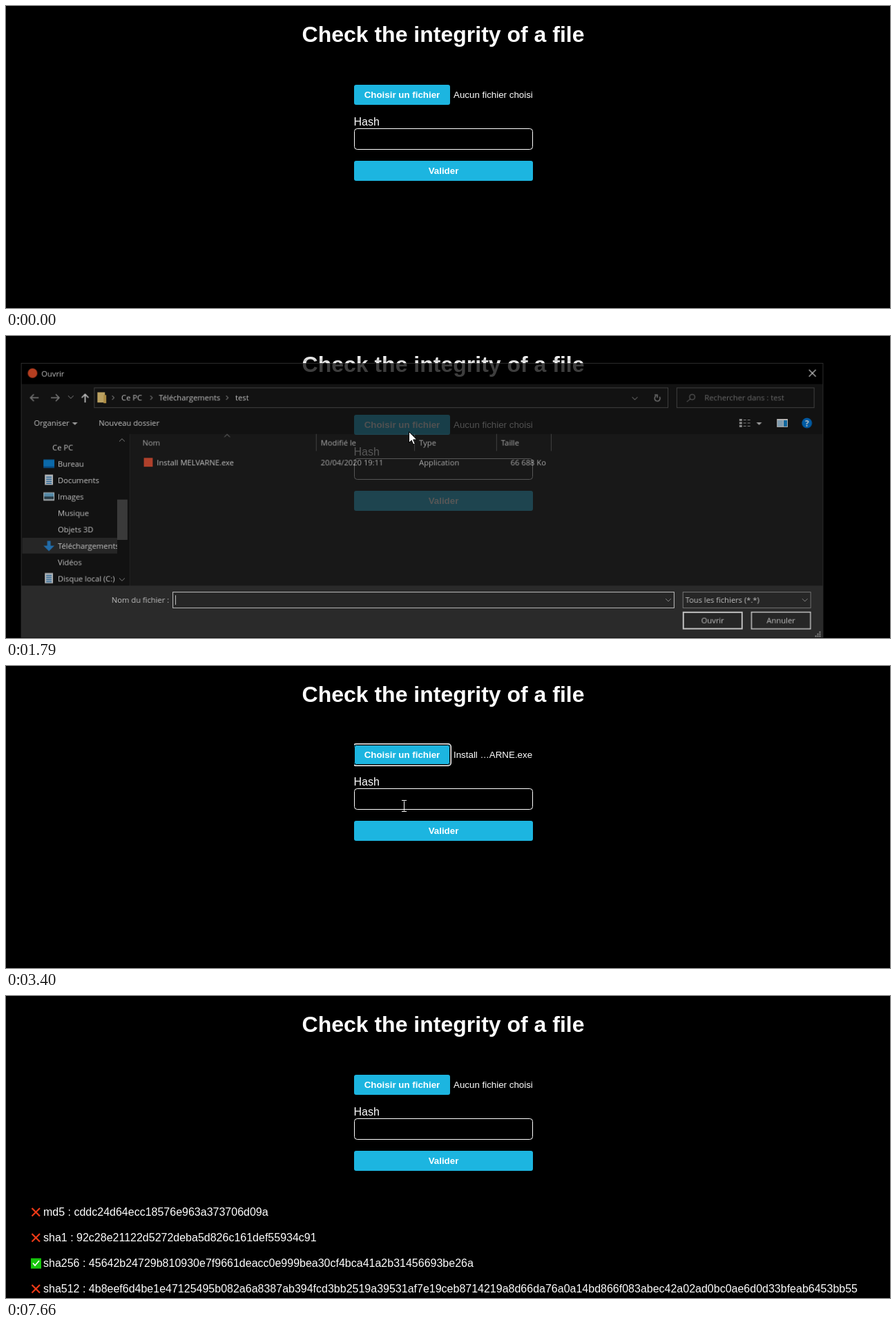
Recreate the animation shown at these times as an HTML page with a canvas. Size 1280 by 437 pixels, loop 8.41 s.

```html
<!DOCTYPE html>
<html lang="en">
<head>
<meta charset="utf-8">
<title>File integrity check</title>
<style>
html, body { margin: 0; width: 100%; height: 100%; overflow: hidden; background: #000; }
canvas { display: block; }
</style>
</head>
<body>
<canvas id="stage" width="1280" height="437"></canvas>
<script>
const LOOP = 8410;
const ARIAL = '"Liberation Sans", Arial, sans-serif';
const UI = '11.3px "Open Sans", "Noto Sans", sans-serif';
const BLUE = '#1cb5e0';
const FILE = 'Install MELVARNE.exe';
const SHORT_FILE = 'Install …ARNE.exe';
const SHA256 = '45642b24729b810930e7f9661deacc0e999bea30cf4bca41a2b31456693be26a';
const RESULTS = [
  ['md5', 'cddc24d64ecc18576e963a373706d09a'],
  ['sha1', '92c28e21122d5272deba5d826c161def55934c91'],
  ['sha256', SHA256],
  ['sha512', '4b8eef6d4be1e47125495b082a6a8387ab394fcd3bb2519a39531af7e19ceb8714219a8d66da76a0a14bd866f083abec42a02ad0bc0ae6d0d33bfeab6453bb55']
];

// Pointer keys: time, x, y
const PATH = [
  [640, 656, 396], [1190, 596, 127], [1280, 596, 127], [1460, 583, 138],
  [1800, 583, 138], [2340, 290.5, 183], [2930, 290.5, 183],
  [3400, 576, 202], [3500, 577, 197], [3920, 577, 197], [4460, 591.5, 239],
  [6320, 591.5, 239], [6960, 552, 380], [7470, 552, 380], [7660, 488, 430]
];
const CLICKS = [[1410, 1510], [2670, 2740], [2800, 2880], [3550, 3650], [4790, 4880]];
const ARROW = new Path2D('M0 0V16L3.7 12.5L6.3 18.5L8.8 17.4L6.2 11.5H11.3Z');
const HAND = new Path2D('M-2 2Q-2 0 0 0Q2 0 2 2V7Q4.5 5.5 5 8Q7.5 6.8 8 9Q10 8.5 10 11V15Q10 18 8 20V23.3H-1V21Q-4 18 -7 13.5Q-6.5 10.5 -3.5 12.8L-2 14.5Z');

const stage = document.getElementById('stage').getContext('2d');
const sheet = document.createElement('canvas');
sheet.width = 1280;
sheet.height = 450;
const panel = sheet.getContext('2d');

const clamp = v => Math.max(0, Math.min(1, v));
const ease = v => v * v * (3 - 2 * v);
const during = (t, a, b) => t >= a && t < b;
const inside = (x, y, l, t, r, b) => x >= l && x < r && y >= t && y < b;

function box(c, x, y, w, h, fill) {
  c.fillStyle = fill;
  c.fillRect(x, y, w, h);
}
function frame(c, x, y, w, h, color, width = 1) {
  c.strokeStyle = color;
  c.lineWidth = width;
  c.strokeRect(x + width / 2, y + width / 2, w - width, h - width);
}
function rounded(c, x, y, w, h, r) {
  c.beginPath();
  c.roundRect(x, y, w, h, r);
}
function write(c, text, x, y, font, color = '#fff', align = 'left') {
  c.font = font;
  c.fillStyle = color;
  c.textAlign = align;
  c.fillText(text, x, y);
}
function line(c, color, width, ...pts) {
  c.strokeStyle = color;
  c.lineWidth = width;
  c.beginPath();
  for (let i = 0; i < pts.length; i += 2) c.lineTo(pts[i], pts[i + 1]);
  c.stroke();
}
function disc(c, x, y, r, color) {
  c.fillStyle = color;
  c.beginPath();
  c.arc(x, y, r, 0, Math.PI * 2);
  c.fill();
}

function button(x, y, w, label, focused) {
  const c = stage;
  rounded(c, x, y, w, 29, 3);
  c.fillStyle = BLUE;
  c.fill();
  if (focused) {
    c.lineWidth = 1.5;
    c.strokeStyle = '#fff';
    rounded(c, x - 1.25, y - 1.25, w + 2.5, 31.5, 4);
    c.stroke();
    c.lineWidth = 1;
    c.strokeStyle = '#000';
    rounded(c, x + .5, y + .5, w - 1, 28, 3);
    c.stroke();
  }
  write(c, label, x + w / 2, y + 19, 'bold 13.333px ' + ARIAL, '#fff', 'center');
}

function drawPage(t) {
  const c = stage;
  const small = '13.333px ' + ARIAL;
  const normal = '16px ' + ARIAL;
  box(c, 0, 0, 1280, 437, '#000');
  write(c, 'Check the integrity of a file', 633, 52, 'bold 32px ' + ARIAL, '#fff', 'center');

  c.save();
  c.beginPath();
  c.rect(504, 100, 300, 60);
  c.clip();
  button(504, 114, 139, 'Choisir un fichier', during(t, 1460, 1510) || during(t, 2900, 3550));
  c.restore();
  write(c, during(t, 2900, 6320) ? SHORT_FILE : 'Aucun fichier choisi', 648, 133, small);

  write(c, 'Hash', 503.5, 173, normal);
  rounded(c, 504.5, 177.5, 258, 30, 4);
  c.strokeStyle = '#fff';
  c.lineWidth = 1;
  c.stroke();
  if (during(t, 3890, 6320)) {
    c.save();
    c.beginPath();
    c.rect(519, 180, 228, 26);
    c.clip();
    const scrolled = t < 4790;
    write(c, SHA256, scrolled ? 745 : 519.5, 197, small, '#fff', scrolled ? 'right' : 'left');
    c.restore();
  }
  if (during(t, 3600, 4600)) box(c, t < 3890 ? 520 : 745, 185, 1, 15, '#fff');

  button(504, 224, 259, 'Valider', during(t, 4790, 6320));
  if (t >= 6320) RESULTS.forEach(([name, hash], i) => {
    const y = 312.5 + i * 37;
    if (name === 'sha256') {
      box(c, 36, y - 7, 15, 15, '#16c60c');
      line(c, '#fff', 1.7, 39, y, 42, y + 3.5, 48, y - 3.5);
    } else {
      line(c, '#f03a17', 2.2, 37.5, y - 5.5, 49, y + 6);
      line(c, '#f03a17', 2.2, 49, y - 5.5, 37.5, y + 6);
    }
    write(c, name + ' : ' + hash, 54, y + 5.5, normal);
  });
}

const chevron = (c, x, y, dx, dy, color = '#aaa') => dx
  ? line(c, color, 1, x - 1.5, y - 3, x + 1.5, y, x - 1.5, y + 3)
  : line(c, color, 1, x - 4, y - 2 * dy, x, y + 2 * dy, x + 4, y - 2 * dy);

function triangle(c, x, y) {
  c.fillStyle = '#ccc';
  c.beginPath();
  c.moveTo(x - 4, y - 2);
  c.lineTo(x + 4, y - 2);
  c.lineTo(x, y + 2);
  c.fill();
}
function arrowIcon(c, x, y, color) {
  const d = color === '#fff' ? [0, 1] : x < 50 ? [1, 0] : [-1, 0];
  const [a, b] = d;
  const tx = x - a * 6, ty = y - b * 6;
  line(c, color, 1.7, x + a * 6, y + b * 6, tx, ty);
  line(c, color, 1.7, tx + a * 5 + b * 5, ty + b * 5 + a * 5, tx, ty, tx + a * 5 - b * 5, ty + b * 5 - a * 5);
}

// Sidebar icons, each about 16 px around its centre
const ICONS = {
  pc(c, x, y) {
    box(c, x - 6, y - 7, 14, 9, '#2da5ec');
    box(c, x - 8, y + 4, 14, 2, '#9cc8e6');
  },
  desk(c, x, y) {
    box(c, x - 8, y - 6, 16, 12, '#0f8be0');
    box(c, x - 8, y + 4, 16, 2, '#0a62ad');
  },
  doc(c, x, y) {
    box(c, x - 6, y - 8, 12, 15, '#e9eef2');
    for (const k of [-5, -2, 1, 4]) box(c, x - 4, y + k, 8, 1.5, '#3989c9');
  },
  image(c, x, y) {
    box(c, x - 8, y - 6, 16, 12, '#e8f1f6');
    box(c, x - 7, y - 5, 14, 6, '#71b7df');
    box(c, x - 7, y, 14, 4, '#334c59');
  },
  music(c, x, y) {
    disc(c, x - 2, y + 4, 3, '#199df0');
    line(c, '#199df0', 2, x, y + 4, x, y - 7, x + 5, y - 1, x + 3, y + 2);
  },
  cube(c, x, y) {
    c.fillStyle = '#24a6dd';
    c.beginPath();
    for (let i = 0; i < 6; i++) c.lineTo(x + 8 * Math.sin(i * Math.PI / 3), y + 8 * Math.cos(i * Math.PI / 3));
    c.fill();
    box(c, x, y - 1, 6, 5, '#b8e8f8');
  },
  down(c, x, y) {
    line(c, '#2d8fe0', 5, x, y - 7, x, y + 1);
    c.fillStyle = '#2d8fe0';
    c.beginPath();
    c.moveTo(x - 8, y);
    c.lineTo(x + 8, y);
    c.lineTo(x, y + 8);
    c.fill();
  },
  film(c, x, y) {
    box(c, x - 6, y - 7, 12, 14, '#777');
    box(c, x - 3, y - 6, 6, 5, '#2c9be0');
    box(c, x - 3, y + 1, 6, 5, '#355');
  },
  disk(c, x, y) {
    box(c, x - 8, y - 4, 5, 4, '#2ba5e8');
    box(c, x - 7, y + 1, 15, 5, '#ddd');
    box(c, x + 3, y + 3, 3, 1, '#2a2');
  }
};
const PLACES = [
  ['Ce PC', 'pc', true], ['Bureau', 'desk'], ['Documents', 'doc'], ['Images', 'image'],
  ['Musique', 'music', true], ['Objets 3D', 'cube', true], ['Téléchargements', 'down'],
  ['Vidéos', 'film', true], ['Disque local (C:)', 'disk']
];

function drawSidebar(c, loaded) {
  box(c, 16, 141, 158, 222, '#191919');
  box(c, 17, 293, 139, 23, '#333');
  c.save();
  c.beginPath();
  c.rect(16, 141, 140, 222);
  c.clip();
  PLACES.forEach(([label, icon, late], i) => {
    const y = 160.5 + i * 24;
    if (loaded || !late) ICONS[!loaded && icon === 'disk' ? 'doc' : icon](c, i ? 56 : 48, y);
    write(c, label, i ? 69 : 61, y + 4, UI);
  });
  c.restore();
  box(c, 156, 237, 15, 59, '#4d4d4d');
  chevron(c, 163, 150, 0, -1);
  chevron(c, 163, 354, 0, 1);
  box(c, 174, 141, 1, 222, '#2b2b2b');
}

function drawDialog(t, hover) {
  const c = panel;
  const picked = t >= 2720;
  const label = (s, x, y, color, align) => write(c, s, x, y + 4, UI, color, align);
  c.clearRect(0, 0, 1280, 450);
  box(c, 15, 37, 1175, 402, '#191919');
  box(c, 16, 38, 1173, 30, '#000');
  disc(c, 32, 52, 7, '#f0522b');
  label('Ouvrir', 45, 52.5);
  line(c, '#fff', 1.2, 1169, 47, 1179, 57);
  line(c, '#fff', 1.2, 1179, 47, 1169, 57);

  arrowIcon(c, 35, 88, '#999');
  arrowIcon(c, 65, 88, '#999');
  chevron(c, 88, 87, 0, 1);
  arrowIcon(c, 109, 89, '#fff');
  frame(c, 122, 73, 841, 30, '#535353');
  box(c, 127, 80, 11, 15, '#f8d580');
  box(c, 136, 84, 4, 12, '#e4b95a');
  [150, 206, 317].forEach(x => chevron(c, x, 88, 1, 0, '#ddd'));
  label('Ce PC', 162, 88);
  label('Téléchargements', 217, 88);
  label('test', 329, 88);
  chevron(c, 914, 89, 0, 1);
  c.strokeStyle = '#999';
  c.lineWidth = 1.4;
  c.beginPath();
  c.arc(947, 89, 4, -.6, 4.2);
  c.stroke();
  line(c, '#999', 1.4, 943, 84, 947, 84, 947, 88);
  frame(c, 975, 73, 202, 30, '#535353');
  c.strokeStyle = '#888';
  c.lineWidth = 1;
  c.beginPath();
  c.arc(998, 87, 4, 0, 7);
  c.stroke();
  line(c, '#888', 1, 995, 90, 990, 94);
  label('Rechercher dans : test', 1016, 88, '#8a8a8a');

  label('Organiser', 34, 125);
  triangle(c, 94, 126);
  label('Nouveau dossier', 129, 125);
  for (let i = 0; i < 3; i++) {
    box(c, 1067, 119 + i * 4.5, 4, 3, '#bbb');
    box(c, 1073, 120 + i * 4.5, 4, 1, '#aaa');
    box(c, 1079, 120 + i * 4.5, 4, 1, '#aaa');
  }
  triangle(c, 1096, 126);
  box(c, 1122, 119, 16, 12, '#eee');
  box(c, 1123, 121, 8, 9, '#a9cfe8');
  box(c, 1132, 121, 5, 9, '#1588d1');
  disc(c, 1166, 125, 7.5, '#0078d7');
  write(c, '?', 1166, 129.5, 'bold 12px "Open Sans", sans-serif', '#fff', 'center');

  drawSidebar(c, t >= 1840);
  box(c, 175, 141, 1014, 222, '#202020');
  [447, 591, 711, 791].forEach(x => box(c, x, 141, 1, 25, '#555'));
  chevron(c, 317, 143.5, 0, -1);
  label('Nom', 193, 154, '#ddd');
  label('Modifié le', 454, 154, '#ddd');
  label('Type', 598, 154, '#ddd');
  label('Taille', 718, 154, '#ddd');
  if (hover || picked) box(c, 190, 172, 598, 22, picked ? '#777' : '#4d4d4d');
  box(c, 195, 176, 13, 13, '#e8553a');
  label(FILE, 214, 183);
  label('20/04/2020 19:11', 454, 183, '#ddd');
  label('Application', 598, 183, '#ddd');
  label('66 688 Ko', 784, 183, '#ddd', 'right');

  box(c, 16, 363, 1173, 75, '#383838');
  label('Nom du fichier :', 232, 384, '#fff', 'right');
  box(c, 237, 372, 735, 24, '#333');
  frame(c, 237, 372, 735, 24, '#fff');
  if (picked) label(FILE, 242, 384);
  else if (t < 2300) box(c, 241, 377, 1, 14, '#fff');
  chevron(c, 963, 384, 0, 1);
  box(c, 984, 372, 188, 24, '#333');
  frame(c, 984, 372, 188, 24, '#9b9b9b');
  label('Tous les fichiers (*.*)', 988, 384);
  chevron(c, 1163, 384, 0, 1);
  [[984, 'Ouvrir'], [1084, 'Annuler']].forEach(([x, s]) => {
    box(c, x, 401, 88, 26, '#333');
    frame(c, x, 401, 88, 26, '#fff', x === 984 ? 2 : 1.5);
    label(s, x + 44, 413.5, '#fff', 'center');
  });
  for (let i = 0; i < 3; i++) for (let j = 0; j <= i; j++) box(c, 1184 - j * 3, 430 + i * 3, 2, 2, '#bbb');
  frame(c, 15, 37, 1175, 402, '#3c3c3c');
}

function showDialog(t, x, y) {
  const alpha = clamp((t - 1685) / 140) * clamp((3050 - t) / 150);
  if (!alpha) return;
  drawDialog(t, inside(x, y, 190, 172, 788, 194));
  const c = stage;
  const scale = 1 - .19 * (1 - alpha) ** 2;
  c.save();
  c.globalAlpha = alpha;
  const shade = c.createLinearGradient(0, 28, 0, 37);
  shade.addColorStop(0, 'rgba(0,0,0,0)');
  shade.addColorStop(1, 'rgba(0,0,0,.3)');
  box(c, 400, 28, 460, 9, shade);
  c.translate(602.5, 205);
  c.scale(scale, scale);
  c.drawImage(sheet, -602.5, -205);
  c.restore();
}

function pointerAt(t) {
  const next = PATH.findIndex(k => k[0] > t);
  if (next < 1) return null;
  const [t0, x0, y0] = PATH[next - 1];
  const [t1, x1, y1] = PATH[next];
  const p = ease((t - t0) / (t1 - t0));
  return [x0 + (x1 - x0) * p, y0 + (y1 - y0) * p];
}

function pointerKind(t, x, y) {
  if (during(t, 1510, 3000)) return 'arrow';
  if (inside(x, y, 504, 114, 643, 143) || inside(x, y, 504, 224, 763, 253)) return 'hand';
  if (inside(x, y, 504, 177, 763, 208)) return 'text';
  const onResult = RESULTS.some((r, i) => inside(x, y, 54, 303 + i * 37, [380, 450, 678, 1234][i], 322 + i * 37));
  return t >= 6320 && onResult ? 'text' : 'arrow';
}

function drawPointer(t, x, y) {
  const c = stage;
  if (CLICKS.some(([a, b]) => during(t, a, b))) disc(c, x, y, 12, 'rgba(205,195,10,.7)');
  const kind = pointerKind(t, x, y);
  c.save();
  c.translate(Math.round(x) + .5, Math.round(y) + .5);
  if (kind === 'text') {
    line(c, '#fff', 1, 0, -7, 0, 7);
    for (const k of [-8, 8]) line(c, '#fff', 1, -3.5, k, 3.5, k);
  } else {
    const shape = kind === 'hand' ? HAND : ARROW;
    c.fillStyle = '#fff';
    c.strokeStyle = '#000';
    c.lineWidth = 1;
    c.fill(shape);
    c.stroke(shape);
    if (kind === 'hand') for (const k of [2, 5, 8]) line(c, '#000', 1, k, 7 + k / 4, k, 12);
  }
  c.restore();
}

function render(now) {
  const t = now % LOOP;
  const pointer = pointerAt(t);
  drawPage(t);
  if (pointer) {
    showDialog(t, ...pointer);
    drawPointer(t, ...pointer);
  }
}

const start = performance.now();
function tick() {
  render(performance.now() - start);
  requestAnimationFrame(tick);
}
tick();
</script>
</body>
</html>
```
